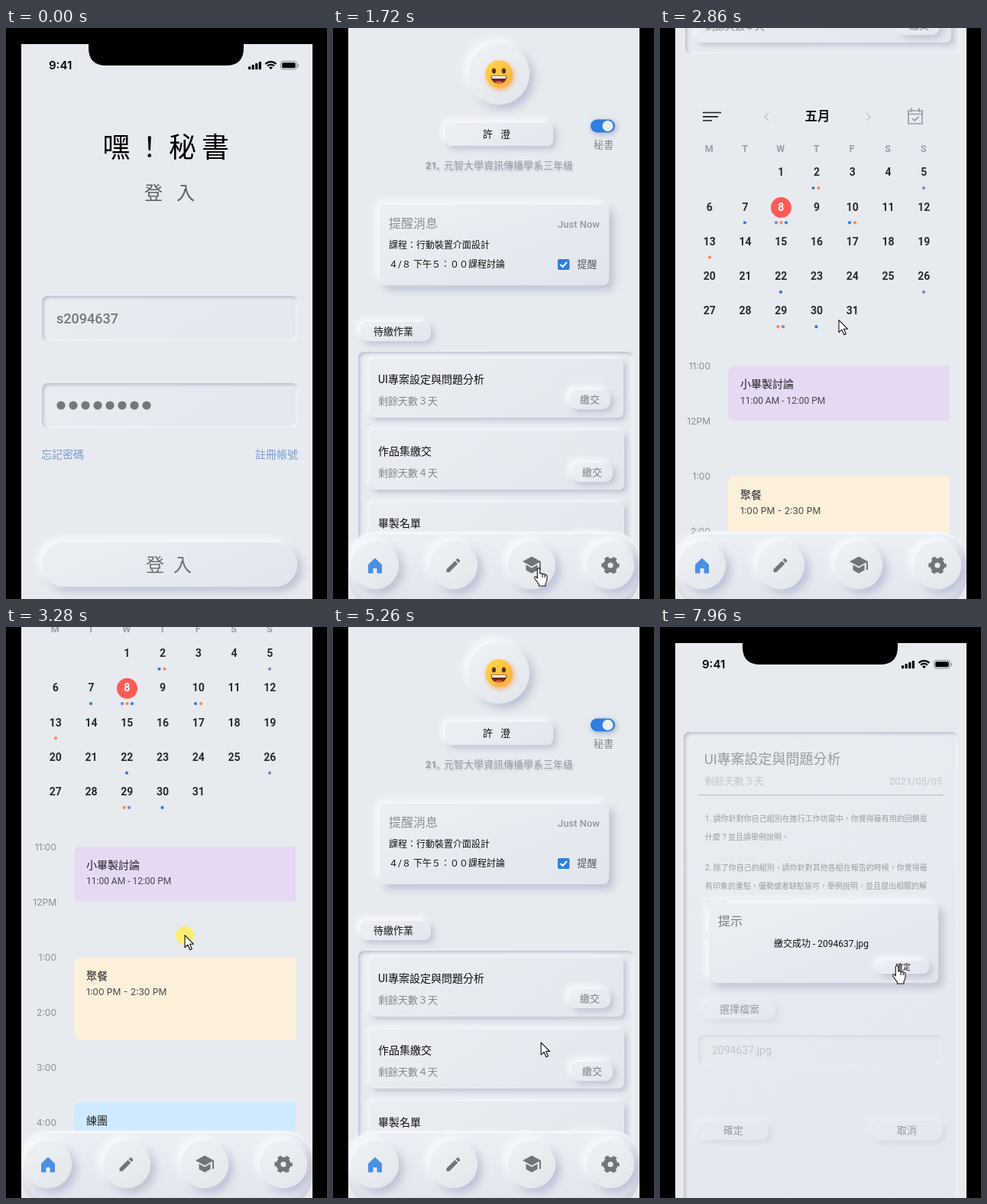
Recreate the animation shown at these times as an HTML page. Size 420x746 px, loop 8000 ms.

```html
<!DOCTYPE html>
<html lang="zh-Hant">
<head>
<meta charset="utf-8">
<title>秘書</title>
<style>
html, body { margin: 0; width: 100%; height: 100%; overflow: hidden; background: #000; }
#stage { position: relative; width: 420px; height: 746px; overflow: hidden; }
section, .layer, svg.ink { position: absolute; left: 0; top: 0; width: 420px; height: 746px; }
svg.ink { overflow: visible; font-family: Roboto, "Noto Sans CJK TC", sans-serif; }
section { background: #e7eaef; clip-path: inset(0 19px 0 20px); }
section.top { clip-path: inset(21px 19px 0 20px); }
.box { position: absolute; }
.up { background: linear-gradient(145deg, #edf0f4, #e2e6ee); box-shadow: -5px -5px 9px #f8faff, 4px 4px 8px #bcc1d3; }
.big { background: linear-gradient(160deg, #eceff3, #e1e5ed); box-shadow: -6px -6px 11px #f7f9fe, 6px 6px 11px #bcc1d4; }
.card { background: linear-gradient(145deg, #eaedf2, #e3e7ed); box-shadow: -3px -3px 6px #f6f8fd, 3px 3px 6px #b9bed0; }
.in { background: linear-gradient(150deg, #e9ecf1, #e3e7ee);
  box-shadow: inset 2px 2px 4px #b7bccd, inset -2px -2px 3px #f6f8fd; }
.nav { background: linear-gradient(180deg, #eceff4, #e1e5ed); box-shadow: inset 0 2px 3px #f9fbff, inset -3px -3px 8px #c7cbd9, 0 -1px 2px #f4f6fa; }
.disc { background: linear-gradient(145deg, #eff2f5, #e2e5eb); box-shadow: -6px -6px 12px #f8faff, 6px 6px 12px #bbc0d4; }
#fog { opacity: 1; }
</style>
</head>
<body>
<div id="stage"></div>
<script>
const stage = document.getElementById('stage');
const GREY = '#85878b', BLUE = '#2f7fdd', ORANGE = '#ff8a4c', PURPLE = '#8186c2';

// y is the optical middle of the line
const text = (x, y, size, str, fill = '#111', more = '') =>
  `<text x="${x}" y="${y + size * 0.375}" font-size="${size}" fill="${fill}" ${more}>${str}</text>`;
const box = (x, y, w, h, r, kind = 'up') =>
  `<div class="box ${kind}" style="left:${x}px;top:${y}px;width:${w}px;height:${h}px;border-radius:${r}px"></div>`;
const ink = (...parts) => `<svg class="ink">${parts.join('')}</svg>`;
const dot = (x, y, r, fill) => `<circle cx="${x}" cy="${y}" r="${r}" fill="${fill}"/>`;
const path = (d, fill = 'none', more = '') => `<path d="${d}" fill="${fill}" ${more}/>`;
const rect = (x, y, w, h, r, fill, more = '') =>
  `<rect x="${x}" y="${y}" width="${w}" height="${h}" rx="${r}" fill="${fill}" ${more}/>`;
const RIGHT = 'text-anchor="end"', MID = 'text-anchor="middle"';
const range = n => [...Array(n).keys()];

function statusBar() {
  const arc = (r, w) => {
    const k = r * 0.7;
    return path(`M${346.5 - k} ${54 - k}A${r} ${r} 0 0 1 ${346.5 + k} ${54 - k}`, 'none', `stroke="#000" stroke-width="${w}"`);
  };
  return ink(
    path('M108 20V26Q108 49 131 49H288Q311 49 311 26V20Z', '#000'),
    '<g class="status">',
    text(56, 48.7, 15, '9:41', '#000', 'font-weight="600" font-family="Inter, sans-serif"'),
    range(4).map(i => rect(317 + i * 4.6, 50.2 - i * 2.1, 3.2, 4 + i * 2.1, 0.8, '#000')).join(''),
    arc(10, 2.2), arc(6.3, 2.2), path('M346.5 54.3L344 51.6Q346.5 49.6 349 51.6Z', '#000'),
    rect(359.5, 43.5, 21, 10.5, 3, 'none', 'stroke="#000" stroke-opacity=".4"'),
    rect(361.2, 45.2, 17.6, 7.1, 1.6, '#000'), rect(381.8, 47, 1.2, 4, 0.6, '#888'),
    '</g>');
}

const login = `<section id="login" class="top">
  ${box(47, 350, 335, 59, 8, 'in')}${box(47, 464, 335, 59, 8, 'in')}${box(47, 672, 334, 58, 29, 'big')}
  ${ink(
    text(126.5, 155.5, 36, '嘿！秘書', '#000', 'letter-spacing="7.2"'),
    text(181, 215, 24, '登入', '#5d5f62', 'letter-spacing="18"'),
    text(66, 379, 18, 's2094637', '#757779', 'font-weight="500"'),
    range(8).map(i => dot(72 + i * 16, 493, 5.6, '#757779')).join(''),
    text(46, 557, 14, '忘記密碼', '#7c9dcd'), text(382, 557, 14, '註冊帳號', '#7c9dcd', RIGHT),
    text(183, 701, 24, '登入', '#6d6f72', 'letter-spacing="12"'))}
  ${statusBar()}</section>`;

function calendar() {
  const colX = i => 64.8 + i * 46.75, rowY = i => 866 + i * 45.3;
  const days = range(31).map(i => {
    const cell = i + 2, x = colX(cell % 7), y = rowY(Math.floor(cell / 7));
    return (i === 7 ? dot(158.5, 912.5, 13.5, '#ff5b58') : '') +
      text(x, y, 14, i + 1, i === 7 ? '#fff' : '#2b2c2f', MID + ' font-weight="700"');
  });
  const marks = [
    [200.5, 0, BLUE], [207.5, 0, ORANGE], [345, 0, PURPLE],
    [111, 1, BLUE], [152, 1, PURPLE], [158.5, 1, ORANGE], [165, 1, BLUE], [248, 1, BLUE], [255, 1, ORANGE],
    [65, 2, ORANGE], [158, 3, BLUE], [345, 3, PURPLE],
    [154.5, 4, ORANGE], [161, 4, PURPLE], [204.5, 4, BLUE]
  ].map(([x, row, c]) => dot(x, rowY(row) + 21, 2.1, c));
  return [
    path('M56 788.5H80M56 793.8H76M56 799H68', 'none', 'stroke="#1c1c1e" stroke-width="1.7"'),
    path('M142 789l-5 5 5 5M270 789l5 5-5 5', 'none', 'stroke="#c0c3ca" stroke-width="1.4"'),
    text(206, 793, 16.5, '五月', '#1b1c1f', MID + ' font-weight="700"'),
    path('M325 786H343V803H325ZM325 790.5H343M329 782.5V788M339 782.5V788M330 796l3 3 5.5-5', 'none', 'stroke="#999da8" stroke-width="1.7"'),
    [...'MTWTFSS'].map((d, i) => text(colX(i) - 0.5, 835, 12.5, d, '#9a9db0', MID + ' font-weight="700"')).join(''),
    ...days, ...marks
  ];
}

function schedule() {
  const inter = 'font-family="Inter, sans-serif"';
  const hours = ['11:00', '12PM', ...range(9).map(i => `${i + 1}:00`)];
  const event = (y, h, fill, name, time, font = inter) =>
    path(`M379 ${y}H99Q89 ${y} 89 ${y + 10}V${y + h - 10}Q89 ${y + h} 99 ${y + h}H379Z`, fill) +
    text(105, y + 24, 14, name, '#1f1f24') + text(105, y + 45, 12, time, '#45464d', font);
  return [
    ...hours.map((h, i) => text(66, 1119.5 + i * 72.1, 12, h, '#8b8d98', RIGHT + ' ' + inter)),
    event(1119, 72, '#e6daf3', '小畢製討論', '11:00 AM - 12:00 PM', ''),
    event(1263.5, 108.5, '#fdf0da', '聚餐', '1:00 PM - 2:30 PM'),
    event(1453, 145, '#cfeafe', '練團', '3:40 PM - 5:40 PM'),
    path('M80 1613H377', 'none', 'stroke="#ff2429" stroke-width="2"'), dot(80, 1613, 4.2, '#ff2429')
  ];
}

const face = dot(219, 63, 17, '#ffa04a" filter="url(#soft)') + dot(217, 60, 17.8, 'url(#sun)') +
  '<ellipse cx="210.5" cy="56" rx="2.6" ry="3.6" fill="#5b3420"/><ellipse cx="223.5" cy="56" rx="2.6" ry="3.6" fill="#5b3420"/>' +
  path('M206.5 62.5H227.5Q227 72.5 217 72.5T206.5 62.5Z', '#6b2a22') +
  path('M207.5 63H226.5L225.8 66H208.2Z', '#fff') + path('M211.5 71Q217 67.5 222.5 71Q217 73.5 211.5 71Z', '#ee5a4c');

const defs = `<defs><filter id="soft" x="-50%" y="-50%" width="200%" height="200%"><feGaussianBlur stdDeviation="3.5"/></filter>
  <linearGradient id="sun" x1="0" y1="0" x2="1" y2="1"><stop offset="0" stop-color="#ffd94e"/><stop offset="1" stop-color="#f9ad35"/></linearGradient></defs>`;

const tasks = [
  { y: 432, w: 332, name: 'UI專案設定與問題分析', left: '３', bx: 309, by: 473 },
  { y: 526, w: 333, name: '作品集繳交', left: '４', bx: 312, by: 568 },
  { y: 620, w: 333, name: '畢製名單', left: '５', bx: 312, by: 662 }
];

const icons = ink(
  path('M46.5 701L55 693 63.5 701V712H58V705.5H52V712H46.5Z', '#4a90e2', 'stroke="#4a90e2" stroke-width="1" stroke-linejoin="round"'),
  `<g transform="translate(145.5 690)">${path('M3 17.25V21h3.75L17.81 9.94l-3.75-3.75ZM20.7 7.04a1 1 0 0 0 0-1.41l-2.34-2.34a1 1 0 0 0-1.41 0l-1.83 1.83 3.75 3.75Z', '#717479')}</g>`,
  path('M260 690.5L272 697 260 703.5 248 697ZM252.5 701.3V708.3L260 712.5 267.5 708.3V701.3L260 705.5ZM270 698V708H272V697Z', '#717479'),
  '<circle cx="363" cy="702" r="6.6" fill="none" stroke="#717479" stroke-width="6"/>',
  '<circle cx="363" cy="702" r="10" fill="none" stroke="#717479" stroke-width="3.4" stroke-dasharray="5.4 5.072" stroke-dashoffset="2.7"/>');

const home = `<section id="home"><div class="layer" id="roll">
  ${box(177, 20, 80, 80, 40, 'disc')}${box(147, 124, 141, 30, 8)}${box(61, 231, 300, 105, 8, 'big')}
  ${box(36, 384, 92, 25, 9)}${box(33, 423, 360, 289, 8, 'in')}
  ${tasks.map(t => box(48, t.y, t.w, 77, 7, 'card') + box(t.bx, t.by, 54, 25, 10)).join('')}
  ${ink(defs, face,
    text(196, 138, 13, '許澄', '#111', 'letter-spacing="10"'),
    text(121, 179, 13, '21,', '#999ca6', 'font-weight="700" style="text-shadow:1px 2px 2px #c3c6d2"'),
    text(145, 179, 13, '元智大學資訊傳播學系三年級', '#999ca6', 'font-weight="500" style="text-shadow:1px 2px 2px #c3c6d2"'),
    rect(338, 121, 33, 18, 9, '#aab3c9', 'filter="url(#soft)"'), rect(337, 119.5, 32, 17, 8.5, BLUE), dot(359.5, 128, 7, '#e9edf5'),
    text(341, 152, 13, '秘書', GREY),
    text(73, 255, 16, '提醒消息', '#8c8e91'), text(349, 256, 13, 'Just Now', '#96989c', RIGHT + ' font-weight="500"'),
    text(73, 283, 12, '課程：行動裝置介面設計'), text(73, 308.5, 12, '４/８ 下午５：００課程討論'),
    rect(294, 302, 15.5, 14, 2, BLUE), path('M297.5 309l3 3 5.5-6', 'none', 'stroke="#fff" stroke-width="2"'),
    text(319.5, 308.5, 13, '提醒', '#55575b'), text(53, 396.5, 13, '待繳作業'),
    ...tasks.map(t => text(59, t.y + 26.5, 14, t.name) + text(59, t.y + 55.5, 13, `剩餘天數${t.left}天`, GREY) +
      text(t.bx + 14, t.by + 12.5, 13, '繳交', '#7b7d81')),
    ...calendar(), ...schedule())}
  </div>
  ${box(20, 659, 381, 96, 36, 'nav')}${[55, 157.5, 260, 363].map(x => box(x - 31, 671, 62, 62, 31, 'disc')).join('')}${icons}</section>`;

const body = [
  [250, '1. 請你針對你自己組別在進行工作坊當中，你覺得最有用的回饋是'], [274, '什麼？並且請舉例說明。'],
  [314, '2. 除了你自己的組別，請你針對其他各組在報告的時候，你覺得最'],
  [338, '有印象的重點，優勢或者缺點皆可，舉例說明，並且提出相關的解'], [362, '決方案。'], [402, '佔期中成績30%']
];
const jp = 'font-family="Roboto, \'Noto Sans CJK JP\', sans-serif"';

const detail = `<section id="detail" class="top">${box(31, 137, 359, 700, 8, 'in')}
  <div class="layer" id="fog">
  ${box(58, 487, 93, 25, 9)}${box(50, 533, 319, 40, 8, 'in')}${box(50, 645, 92, 25, 9)}${box(277, 645, 92, 25, 9)}
  ${ink(
    text(58, 172, 18, 'UI專案設定與問題分析'), text(58, 201, 13, '剩餘天數３天', GREY), text(369, 201.5, 13, '2021/05/05', GREY, RIGHT),
    path('M49 219.5H371', 'none', 'stroke="#66686c"'),
    ...body.map(([y, s]) => text(59, y, 10, s, '#111', jp)),
    text(78, 499.5, 13, '選擇檔案'), `<g id="file">${text(68, 553, 14, '2094637.jpg', GREY)}</g>`,
    text(83, 657.5, 13, '確定'), text(310, 657.5, 13, '取消'))}
  </div>
  <div class="layer" id="dialog">${box(64, 361, 300, 104, 8, 'big')}${box(284, 436, 68, 17, 8)}
  ${ink(text(76, 384, 16, '提示', '#77797d'), text(149, 413, 12, '繳交成功 - 2094637.jpg'), text(308, 444.5, 10, '確定'))}</div>
  ${statusBar()}</section>`;

const cursor = `<svg class="ink"><g id="cursor"><circle id="press" r="12" fill="#fdf05a" fill-opacity=".85"/>
  <g fill="#fff" stroke="#111" stroke-width="1.1" stroke-linejoin="round">
  <path id="arrow" d="M0 0V16L4 12.5 6.7 19 9.3 18 6.6 11.6H11.5Z"/>
  <path id="hand" d="M-1.7 2Q0-1.3 1.8 2V8Q4.2 6.3 5 8.7 7.2 7.2 8.2 9.5 10.7 8.6 11 11.5V16Q10.6 19 9 21V24H.5V22L-5 14.5Q-6.2 11.2-3.3 12L-1.7 14Z"/>
  <path d="M5 9V13M8.2 9.8V13" id="fingers" fill="none"/></g></g></svg>`;

stage.innerHTML = login + home + detail + cursor;
const el = Object.fromEntries([...stage.querySelectorAll('[id]')].map(e => [e.id, e]));
const statusIcons = detailStatus();
function detailStatus() { return el.detail.querySelector('.status'); }

// Smooth curve through [time, value] keys that never overshoots
function follow(keys, t, k = 1) {
  const last = keys.length - 1;
  if (t <= keys[0][0]) return keys[0][k];
  if (t >= keys[last][0]) return keys[last][k];
  const i = keys.findIndex(p => p[0] > t) - 1;
  const slope = j => j < 0 || j >= last ? 0 : (keys[j + 1][k] - keys[j][k]) / (keys[j + 1][0] - keys[j][0]);
  const tangent = j => {
    const a = slope(j - 1), b = slope(j);
    return a * b <= 0 ? 0 : 2 * a * b / (a + b);
  };
  const d = keys[i + 1][0] - keys[i][0], u = (t - keys[i][0]) / d, v = 1 - u;
  return keys[i][k] * v * v * (1 + 2 * u) + keys[i + 1][k] * u * u * (3 - 2 * u) +
    d * u * v * (v * tangent(i) - u * tangent(i + 1));
}

const scroll = [[1880, 0], [2300, 420], [2650, 672], [2860, 678], [3080, 678], [3400, 930], [3560, 974], [3920, 974], [4320, 0]];
const mouse = [
  [530, 340, 708], [770, 246, 707], [1070, 246, 707], [1720, 269, 705], [1850, 260, 672], [1920, 252, 640],
  [2250, 236, 300], [2640, 234, 300], [2860, 234, 381], [3060, 234, 690], [3400, 234, 290], [3880, 234, 310], [3930, 234, 310],
  [4320, 185, 750], [4370, 176, 740], [4480, 170, 676], [4640, 163, 704], [4890, 163, 704],
  [5260, 272, 543], [5730, 328, 488], [6010, 328, 488], [6140, 329, 486], [6500, 329, 486],
  [6709, 118, 560], [6880, 118, 647], [7540, 118, 647], [7955, 310, 442]
];
const within = (t, spans) => spans.some(([a, b]) => t >= a && t < b);
const handTimes = [[530, 1840], [4520, 4990], [5690, 6140], [6800, 7610], [7860, 8000]];
const pressTimes = [[1920, 2250], [3080, 3400], [3900, 4300]];
const show = (e, on) => { e.style.display = on ? '' : 'none'; };

function draw(t) {
  show(el.login, t < 1070);
  show(el.home, t >= 1070 && t < 6010);
  show(el.detail, t >= 6010);
  el.roll.style.transform = `translateY(${-follow(scroll, t)}px)`;

  const fade = follow([[7060, 0], [7420, 1]], t);
  el.dialog.style.opacity = fade;
  el.fog.style.opacity = 1 - 0.64 * fade;
  statusIcons.setAttribute('transform', `translate(${fade > 0 ? -1 : 0} 0)`);
  show(el.file, t >= 6710);

  const hand = within(t, handTimes);
  show(el.cursor, within(t, [[530, 6500], [6710, 8000]]));
  show(el.hand, hand);
  show(el.fingers, hand);
  show(el.arrow, !hand);
  show(el.press, within(t, pressTimes));
  el.cursor.setAttribute('transform', `translate(${follow(mouse, t, 1)} ${follow(mouse, t, 2)})`);
}

const start = performance.now();
function tick() {
  draw((performance.now() - start) % 8000);
  requestAnimationFrame(tick);
}
tick();
</script>
</body>
</html>
```
